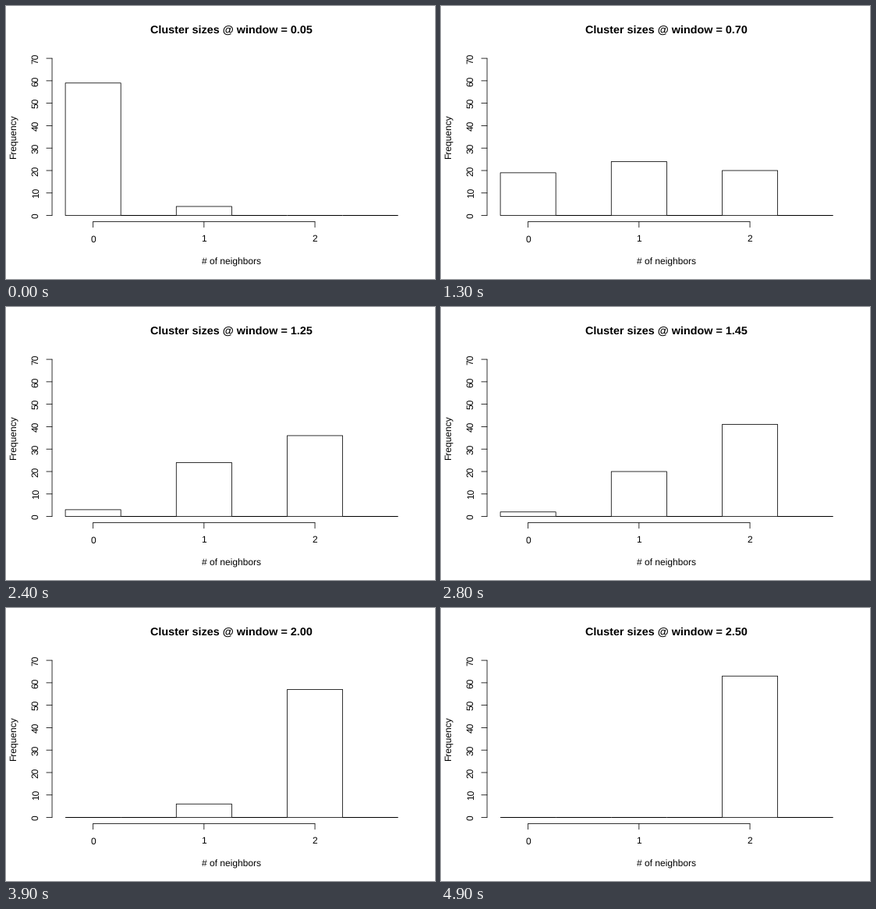
These frames come from a looping animation (550 px wide and 350 px high, 5000 ms). A matplotlib script:

```python
import numpy as np
import matplotlib.pyplot as plt
from matplotlib.animation import FuncAnimation
from matplotlib.patches import Rectangle

W, H, DPI = 550, 350, 100
FRAMES, INTERVAL = 50, 100
PX = 72 / DPI  # points per pixel
LINE = 0.8 * PX

plt.rcParams["font.family"] = "Liberation Sans"
plt.rcParams["text.hinting"] = "none"

# Plot region in pixels, with margins counted in text lines
EM = 14.4
LEFT, RIGHT = 4.1 * EM, W - 2.1 * EM
TOP, BOTTOM = 4.1 * EM, H - 5.1 * EM
MID_X, MID_Y = (LEFT + RIGHT) / 2, (TOP + BOTTOM) / 2
TICK = EM / 2
BIN = 0.5

# Groups of three points: how many hold at least one, two or three links
KEYS = [0, 6, 13, 18, 24, 30, 33, 39, 42, 48]
LINKS = [
    [2, 10, 16, 18, 21, 21, 21, 21, 21, 21],
    [0, 6, 12, 14, 18, 20, 21, 21, 21, 21],
    [0, 2, 4, 6, 9, 13, 15, 18, 20, 21],
]


def px_x(value):
    return LEFT + (RIGHT - LEFT) * (value + 0.25 + 0.12) / 3.24


def px_y(value):
    return BOTTOM - (BOTTOM - TOP) * (value + 2.8) / 75.6


def counts(frame):
    """Number of points with 0, 1 and 2 neighbors."""
    one, two, three = (int(np.interp(frame, KEYS, row) + 1e-6) for row in LINKS)
    return 63 - 2 * one - two, 2 * (one - three), two + 2 * three


fig = plt.figure(figsize=(W / DPI, H / DPI), dpi=DPI, facecolor="white")
ax = fig.add_axes([0, 0, 1, 1])
ax.set_xlim(0, W)
ax.set_ylim(H, 0)
ax.axis("off")


def line(xs, ys):
    ax.plot(xs, ys, color="black", lw=LINE, snap=False, solid_capstyle="round")


def label(x, y, text, size=12, rotation=0, weight="normal"):
    return ax.text(x, y, text, fontsize=size * PX, rotation=rotation,
                   weight=weight, ha="center", va="baseline",
                   rotation_mode="anchor", color="black")


line([px_x(0), px_x(2)], [BOTTOM, BOTTOM])
for value in range(3):
    x = px_x(value)
    line([x, x], [BOTTOM, BOTTOM + TICK])
    label(x, BOTTOM + 1.8 * EM, str(value))

line([LEFT, LEFT], [px_y(0), px_y(70)])
for value in range(0, 71, 10):
    y = px_y(value)
    line([LEFT - TICK, LEFT], [y, y])
    label(LEFT - 1.2 * EM, y, str(value), rotation=90)

label(MID_X, BOTTOM + 3.8 * EM, "# of neighbors")
label(LEFT - 3.2 * EM, MID_Y, "Frequency", rotation=90)
title = label(MID_X, 34.7, "", size=14.4, weight="bold")

bars = []
for i in range(6):
    x = px_x(-0.25 + i * BIN)
    bar = Rectangle((x, px_y(0)), px_x(BIN) - px_x(0), 0, fill=False,
                    edgecolor="black", joinstyle="round", snap=False)
    bars.append(ax.add_patch(bar))


def update(frame):
    title.set_text(f"Cluster sizes @ window = {(frame + 1) * 0.05:.2f}")
    heights = np.zeros(6)
    heights[::2] = counts(frame)
    for bar, height in zip(bars, heights):
        bar.set_height(px_y(height) - px_y(0))
        # An empty bin shows its top and bottom edges on top of each other
        bar.set_linewidth(LINE if height else PX)
    return [title, *bars]


anim = FuncAnimation(fig, update, frames=FRAMES, interval=INTERVAL,
                     repeat=True, repeat_delay=0, blit=False)
plt.show()
```
